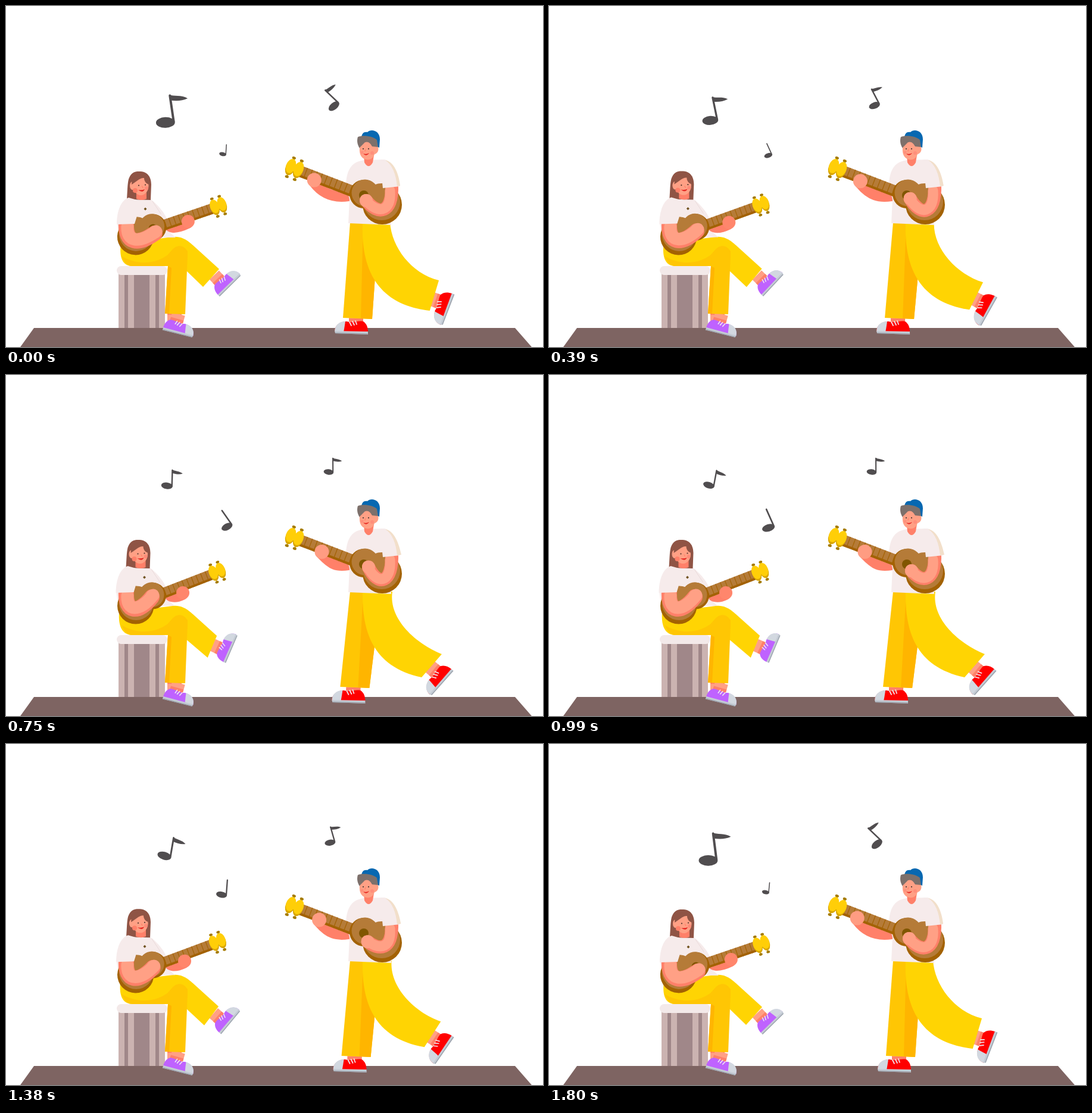
These frames come from a looping animation (902x573 px, 1.83 s). An HTML page:

```html
<!DOCTYPE html>
<html lang="en">
<head>
<meta charset="utf-8">
<title>Guitar duo</title>
<style>
html, body { margin: 0; height: 100%; overflow: hidden; background: #fff; }
svg { display: block; width: 100vw; height: 100vh; }
</style>
</head>
<body>
<svg id="stage" viewBox="0 0 902 573"></svg>
<script>
const LOOP = 1830, STEP = 30;
const SKIN = '#ffa085', BLUSH = '#ff8069', SHIRT = '#f6ebeb', INK = '#504d4f';
const HAIR = '#8f5445', LIPS = '#e62822', STRIPE = '#a08789';
const YELLOW = '#ffd403', GOLD = '#ffce08', AMBER = '#ffc604', ORANGE = '#ffb500';
const WOOD = '#b57b38', BARK = '#a36203';

// wave peaks once per loop; swing eases 0 -> 1 -> 0 and lingers at both ends
const wave = (t, peak) => Math.cos(2 * Math.PI * (t - peak) / LOOP);
const swing = (t, mid = .42) => 1 / (1 + Math.exp(10 * (mid - (1 - wave(t, 0)) / 2)));
const mix = (a, b, k) => a + (b - a) * k;
const point = (x1, y1, x2, y2, k) => `${mix(x1, x2, k)} ${mix(y1, y2, k)}`;

const path = (d, fill) => `<path d="${d}" fill="${fill}"/>`;
const line = (d, color, w) =>
  `<path d="${d}" fill="none" stroke="${color}" stroke-width="${w}" stroke-linecap="round" stroke-linejoin="round"/>`;
const oval = (x, y, rx, ry, fill) => `<ellipse cx="${x}" cy="${y}" rx="${rx}" ry="${ry}" fill="${fill}"/>`;
const disc = (x, y, r, fill) => oval(x, y, r, r, fill);
const rect = (x, y, w, h, fill, r = 0) =>
  `<rect x="${x}" y="${y}" width="${w}" height="${h}" rx="${r}" fill="${fill}"/>`;
const group = (transform, body) => `<g transform="${transform}">${body}</g>`;
const place = (x, y, turn, sx, sy, body) =>
  group(`translate(${x} ${y}) rotate(${turn}) scale(${sx} ${sy})`, body);

// Turns and grows around its own middle
const note = (x, y, turn, size, flag = '') => place(x, y, turn, size, size,
  group('translate(-8 22)', group('rotate(7)', oval(0, 0, 16, 9, INK)) +
    line('M14 0V-44', INK, 4) + path(flag, INK)));

// Toe on the left, sole down
const shoe = (x, y, turn, sx, sy, color) => place(x, y, turn, sx, sy,
  rect(-4, -24, 24, 18, SKIN) + rect(-4, -15, 24, 7, BLUSH) +
  path('M-28 7C-28 -4 -18 -10 -8 -10C2 -7 12 -12 20 -10C26 -6 28 0 28 8Z', color) +
  path('M-28 7C-28 -4 -20 -10 -10 -10C-11 -3 -12 3 -13 8Z', '#d2d8e0') +
  path('M-28 6L28 7V12L-27 10Z', '#c4cbd4') +
  line('M-26 9.5L27 11', '#9ca4ae', 1.5) +
  line('M-3 -9L0 -3M2 -10L5 -4M7 -11L9 -5', '#f0e9f2', 1.7));

function guitar(x, y, turn, sx, sy) {
  let neck = rect(-112, -8, 100, 19, WOOD) + rect(-112, 7, 100, 4, BARK);
  for (let fret = -105; fret < -20; fret += 9) neck += rect(fret, -8, 1.2, 19, BARK);
  for (const px of [-131.5, -117.5])
    neck += line(`M${px} -14V17`, '#c99a00', 1.5) +
      oval(px, -15.5, 3.2, 2.3, '#a57b00') + oval(px, 18, 3.2, 2.3, '#a57b00') +
      oval(px, 1.5, 8, 13.5, '#d9a600') + oval(px, -1, 8, 12.5, GOLD);
  neck += rect(-129, -5, 10, 11, GOLD);
  return place(x, y, turn, sx, sy,
    group('rotate(21)', neck) +
    disc(31, 17, 33, BARK) + disc(0, -1, 24, BARK) +
    disc(30, 12, 31, WOOD) + disc(2, -3, 22.5, WOOD) +
    path('M10 -22Q20 -10 34 -21L34 -3L14 10Z', WOOD) +
    path('M16 -23Q23 -16 33 -22L30 -30H18Z', SHIRT) +
    disc(0, 1, 8, '#805600'));
}

const scenery = path('M47 541H855L883 573H24Z', '#7e6462') +
  rect(189, 445, 78, 96, '#cbb3b1') + rect(199, 450, 6, 91, STRIPE) +
  rect(215, 450, 26, 91, STRIPE) + rect(251, 450, 6, 91, STRIPE) +
  rect(186, 437, 85, 15, '#f3e9e9', 7.5);

const womanHead =
  path('M203 325C204 311 204 299 206 291C210 279 217 277.5 226 278C240 279 244 290 244 300L243 326Z', HAIR) +
  path('M219 310H236V324Q228 328 219 324Z', BLUSH) +
  oval(226.5, 302, 13, 16, SKIN) + oval(212.5, 302, 4.5, 7, SKIN) +
  path('M211 300C218 296 225 288 232 289C232 295 236 299 241 300V287L230 281L212 288Z', HAIR) +
  disc(217, 310, 4, BLUSH) + disc(236, 306, 3, '#ff8b78') +
  disc(223, 301.5, 1.1, '#4b302a') + disc(234, 300.5, 1.1, '#4b302a') +
  line('M228.5 303L230 305.5', BLUSH, 1.2) + path('M222 309Q228 310 233 308Q230 315 222 309Z', LIPS);

function woman(t) {
  const k = swing(t), kick = swing(t, .6);
  const fx = mix(306, 297, k), fy = mix(362, 366, k);
  const hx = mix(250, 245, k), hy = mix(380, 371, k);
  const upper = `translate(${-1.5 * k} ${-k})`;
  const arm = `C200 400 222 402 ${hx} ${hy + 2}`;
  const hem = `L${point(331, 472, 339, 475, kick)}L${point(358, 442, 354, 438, kick)}`;
  return rect(271, 514, 24, 16, SKIN) + rect(271, 514, 24, 5, BLUSH) +
    shoe(291, 541, 16, -.93, .93, '#bf62ff') +
    shoe(370, mix(463, 456, kick), mix(-43, -66, kick), -.91, .91, '#bf62ff') +
    path(`M${193 - 3 * kick} 398C${190 - 2 * kick} 422 195 437 213 437H275L300 442${hem}` +
      'L314 402C300 389 290 387 280 388L225 395Z', YELLOW) +
    path('M194 420C200 434 205 437 213 437H275L303 446L305 412C294 396 279 408 272 418C250 434 220 436 194 420Z', AMBER) +
    path('M272 437C271 396 304 396 305 418L301 518L267 517Z', AMBER) +
    path('M272 437L278 440L274 517L267 517Z', ORANGE) +
    group(upper,
      path('M206 322C215 320 238 321 246 327C258 337 268 350 271 360L268 374L285 389H190L187 367Z', SHIRT) +
      womanHead + line('M246 328L260 349', '#e9dada', 1) +
      path('M234 338.5L236.5 341L234 343.5L231.5 341Z', '#70521f')) +
    line(`M272 364C270 375 283 378 ${fx} ${fy + 5}`, BLUSH, 14) +
    guitar(247 - k / 2, 373 - k, 2.2 - 2.4 * k, -.93, .93) +
    disc(fx, fy, 11, '#ff866c') +
    line('M202 364' + arm, BLUSH, 26) +
    group('translate(2 -3)', line('M202 373' + arm, SKIN, 21)) +
    disc(hx, hy, 10.5, SKIN) +
    group(upper, path('M206 322C193 326 186 345 186 367L216 366L224 340L220 326Z', SHIRT));
}

const manHead =
  path('M601 251H618L616 263Q609 275 602 263Z', BLUSH) +
  path('M597 223C597 213 602 211 607 212C613 206 628 209 628 224L627 238L616 233Z', '#0768b1') +
  path('M591 220C600 216 617 219 623 225L625 238L613 246L594 239C590 233 589 226 591 220Z', '#7d706b') +
  path('M594 238C597 235 600 232 603 229C609 227 612 231 615 236L625 237C627 245 622 248 619 249C617 256 611 259 606 258C597 257 593 249 594 238Z', SKIN) +
  disc(615, 247, 3, '#ff8f7b') + disc(598, 246, 2.5, '#ff8f7b') +
  disc(600, 240, 1.1, '#3c302e') + disc(609, 240, 1.1, '#3c302e') +
  line('M604 241L603 244', BLUSH, 1.2) + path('M600 248Q605 250 610 247Q605 254 600 248Z', LIPS);

function man(t) {
  const k = swing(t), foot = 2.5 * (1 - wave(t, 0));
  const fx = mix(517.5, 530.5, k), fy = mix(292.5, 297, k);
  const hx = mix(605, 609, k), hy = 327 - 8 * k * wave(t, LOOP / 4);
  const arm = `C650 350 625 ${352 - 1.2 * (hy - 327)} ${hx} ${hy}`;
  const backLeg = `M599 364C${point(596, 440, 598, 430, k)} ${point(622, 502, 615, 490, k)} ` +
    `${point(712, 512, 698, 508, k)}L${point(727, 461, 732, 469, k)}` +
    `C${point(680, 449, 690, 452, k)} ${point(648, 405, 642, 411, k)} ${point(645, 364, 649, 364, k)}Z`;
  return shoe(580 - foot, 540, 0, 1, 1, '#ff0000') +
    shoe(mix(733, 724.5, k), mix(507, 511, k), mix(-71, -50, k), 1, 1, '#ff0000') +
    path(`M578 364L${566 - foot} 524L${615 - foot} 526L621 440V364Z`, AMBER) +
    path(`M600 364L${596 - foot} 525L${615 - foot} 526L621 440L606 364Z`, ORANGE) +
    path(backLeg, YELLOW) +
    line(`M${fx} ${fy + 4}C${fx + 17} 319 555 322 575 319`, BLUSH, 18) +
    path('M602 259C583 261 572 272 571 301L577 325L575 365L647 368L644 305L660 302C657 280 650 262 636 258Z', SHIRT) +
    manHead +
    guitar(601, 317, 0, 1, 1) +
    disc(fx, fy, 12, '#ff9c82') +
    line('M648 299' + arm, BLUSH, 22) +
    group('translate(-2 -2)', line('M647 312' + arm, SKIN, 17)) +
    disc(hx, hy, 11, SKIN) +
    path('M630 258C652 259 659 285 662 303L633 306L631 288Z', SHIRT) +
    path(`M637 259C653 262 660 284 ${662 + 2 * k} 302L657 303C655 282 649 267 637 259Z`, '#f2dfca');
}

function notes(t) {
  const k = swing(t), flag = 'M13 -46C20 -41 34 -43 43 -35C34 -32 24 -33 13 -36Z';
  return note(mix(272.5, 275.5, k), 173, 13 * wave(t, 1170), mix(1, .6, k), flag) +
    note(mix(544, 546, k), mix(154.5, 151.5, k), mix(-47, 0, k), mix(.66, .52, k), flag) +
    note(367.5, 241, 23 * wave(t, 1600) - 12.5, .52 - .16 * wave(t, 100));
}

const stage = document.getElementById('stage');
function draw() {
  const t = Math.floor(performance.now() % LOOP / STEP) * STEP;
  stage.innerHTML = scenery + woman(t) + man(t) + notes(t);
  requestAnimationFrame(draw);
}
draw();
</script>
</body>
</html>
```
